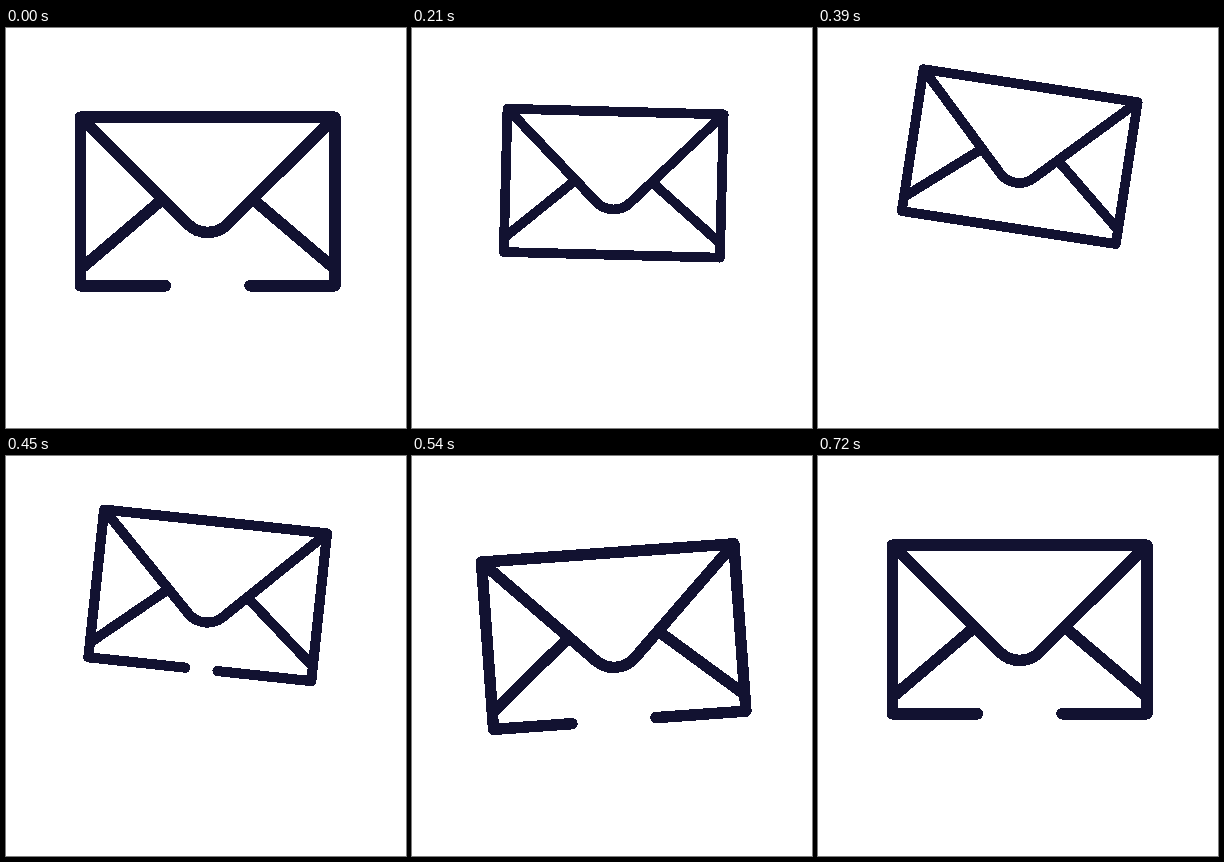
Write an HTML page that moves like this. It is 400 by 400 pixels and loops after 2750 ms.

```html
<!DOCTYPE html>
<html lang="en">
<head>
<meta charset="utf-8">
<title>Envelope</title>
<style>
  html, body { margin: 0; width: 100%; height: 100%; overflow: hidden; background: #fff; }
  svg { display: block; width: 100%; height: 100%; }
  path {
    fill: none; stroke: #121231; stroke-width: 11.5;
    stroke-linecap: round; stroke-linejoin: round; shape-rendering: crispEdges;
  }
</style>
</head>
<body>
<svg viewBox="0 0 400 400">
  <rect id="backdrop" width="400" height="400" fill="#fff"/>
  <g id="envelope">
    <path id="frame"/>
    <path d="M-127.2 -84.3 L-19.8 22.7 A28 28 0 0 0 19.8 22.7 L127.2 -84.3"/>
    <path d="M-46 -1.5 L-126 66.5 M46 -1.5 L126 66.5"/>
  </g>
</svg>
<script>
const LOOP = 2750, STEP = 30;
const CENTER = { x: 201.7, y: 173.5 };
const HALF = { w: 127.2, h: 84.3, gap: 42.3 };
const SHRINK = 0.15;

// The toss: crouch, fly up, drop back, then ring out.
const CROUCHED = 120, TOP = 372, LANDED = 543, REST = 720;
const LIFT = { low: 20.3, high: -45.5, land: 9 };
const TILT = { low: -9, high: 8.9, land: -4.6 };

const [backdrop, envelope, frame] =
  ["backdrop", "envelope", "frame"].map(id => document.getElementById(id));

const progress = (t, from, to) => Math.min(1, Math.max(0, (t - from) / (to - from)));
const smooth = u => u * u * (3 - 2 * u);

function draw(time) {
  const t = Math.floor((time % LOOP) / STEP + 1e-6) * STEP;

  const crouch = smooth(progress(t, 0, CROUCHED));
  const rise = 1 - (1 - progress(t, CROUCHED, TOP)) ** 2;
  const drop = progress(t, TOP, LANDED);
  const fall = drop ** 2;
  const settle = progress(t, LANDED, REST);
  const ring = Math.cos(1.5 * Math.PI * settle) * (1 - settle ** 2);
  const swing = ({ low, high, land }) =>
    low * crouch + (high - low) * rise + (land - high) * fall + land * (ring - 1);

  const tilt = swing(TILT);
  const shrink = crouch - fall;

  // The opening hangs below the centre when the envelope is full size.
  const { w, h } = HALF;
  const gap = HALF.gap * (1 - crouch + smooth(drop));
  const shift = h * Math.sin(tilt * Math.PI / 180) * (1 - shrink);

  frame.setAttribute("d", `M${shift - gap} ${h} H${-w} V${-h} H${w} V${h} H${shift + gap}`);
  envelope.setAttribute("transform",
    `translate(${CENTER.x} ${CENTER.y + swing(LIFT)}) rotate(${tilt}) scale(${1 - SHRINK * shrink})`);
  backdrop.setAttribute("fill", t >= 480 && t < 540 ? "#000" : "#fff");
}

const start = performance.now();
function tick() {
  draw(performance.now() - start);
  requestAnimationFrame(tick);
}
tick();
</script>
</body>
</html>
```
